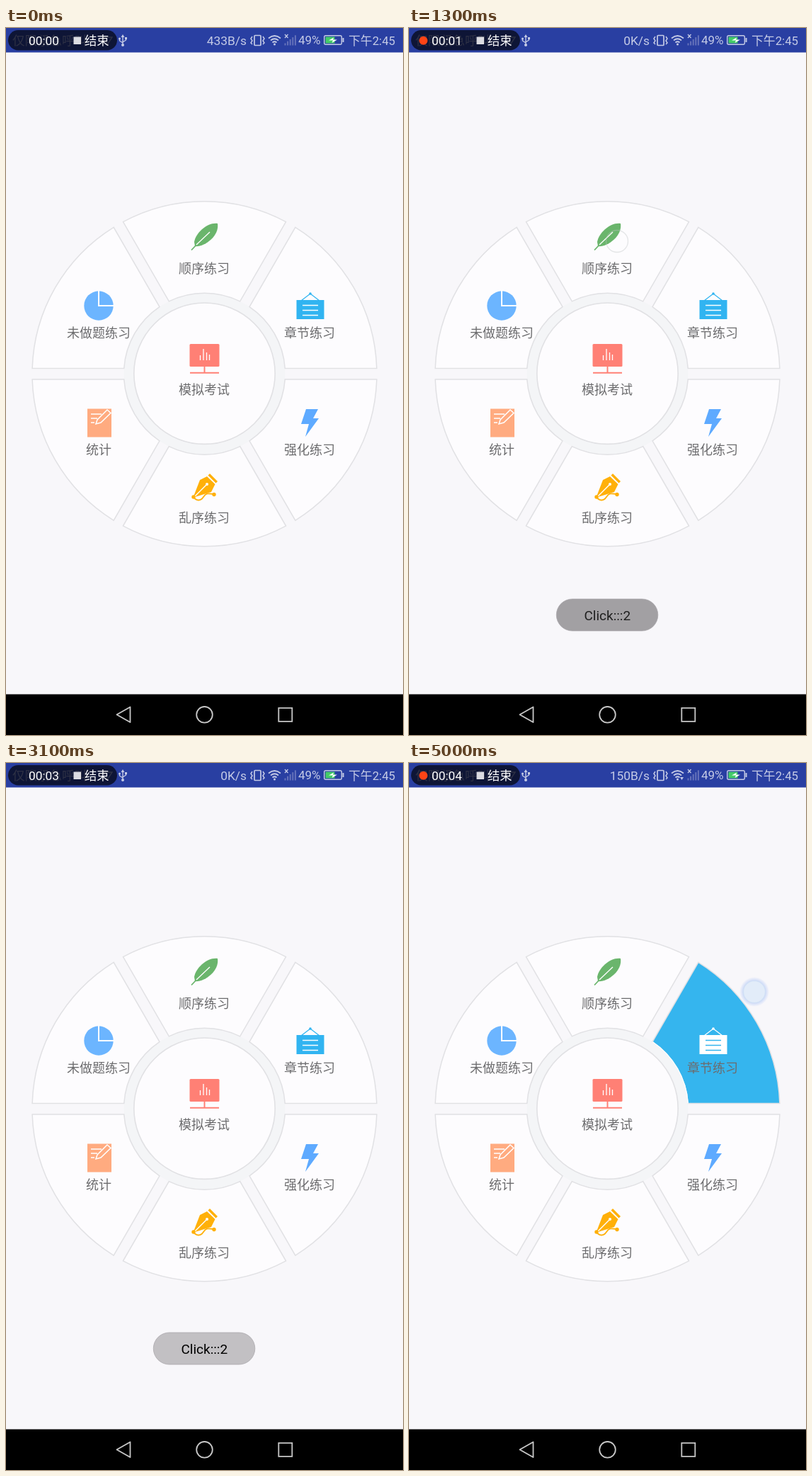
An HTML page with a canvas for the animation above (5100 ms loop, 561 by 998 pixels).

```html
<!DOCTYPE html>
<html lang="zh">
<head>
<meta charset="utf-8">
<title>Practice wheel</title>
<style>
html, body { margin: 0; width: 100%; height: 100%; overflow: hidden; background: #f8f7fa; }
canvas { display: block; width: 561px; height: 998px; }
</style>
</head>
<body>
<canvas id="stage" width="561" height="998"></canvas>
<script>
const ctx = document.getElementById('stage').getContext('2d');
const LOOP = 5100, STEP = 100;
const CX = 280.5, CY = 488.2, OUTER = 243.5, INNER = 114, GAP = 7.7;
const BLUE = '#35b5ee', PAPER = '#fdfcfe', EDGE = '#e1e1e4';
const FONT = 'Roboto, "Noto Sans CJK SC", "Noto Sans CJK", sans-serif';
const STATUS = '#c5cbe6';

const lerp = (a, b, p) => a + (b - a) * p;
const part = (t, a, b) => Math.min(1, Math.max(0, (t - a) / (b - a)));

function text(s, x, y, size, color, align = 'left') {
  ctx.font = `${size}px ${FONT}`;
  ctx.textAlign = align;
  ctx.fillStyle = color;
  ctx.fillText(s, x, y);
}

function rect(x, y, w, h, color, r = 0) {
  ctx.beginPath();
  ctx.roundRect(x, y, w, h, r);
  ctx.fillStyle = color;
  ctx.fill();
}

function disc(x, y, r, color) {
  ctx.beginPath();
  ctx.arc(x, y, r, 0, Math.PI * 2);
  ctx.fillStyle = color;
  ctx.fill();
}

function ring(x, y, r, color, width) {
  ctx.beginPath();
  ctx.arc(x, y, r, 0, Math.PI * 2);
  line(color, width);
}

function line(color, width) {
  ctx.strokeStyle = color;
  ctx.lineWidth = width;
  ctx.stroke();
}

function stroke(d, color, width = 1.5) {
  ctx.strokeStyle = color;
  ctx.lineWidth = width;
  ctx.stroke(new Path2D(d));
}

function fill(d, color) {
  ctx.fillStyle = color;
  ctx.fill(new Path2D(d));
}

// Each icon takes its body colour and the colour of its inner lines.
const icons = {
  feather(c, l) {
    fill('M299 276C285 274 268 289 266 302L267 308C279 310 302 294 299 276Z', c);
    stroke('M262 313.5L270 305', c, 1.8);
    stroke('M269 306L288 288', l, 1.3);
  },
  sign(c, l) {
    rect(410.5, 384, 39, 27, c);
    stroke('M417 385L430 375L443 385', c, 1.3);
    disc(430, 375, 1.8, c);
    stroke('M419 391.5H441M419 398.5H441M419 405.5H441', l, 1.4);
  },
  bolt(c) {
    fill('M424 538H441L434 551H442L423 577L428 559H417Z', c);
  },
  pen(c, l) {
    fill('M288 629L299 640L296.5 642.5L285.5 631.5Z', c);
    fill('M284 633L295.5 644L290 655L267 662L265.5 660L274 638Z', c);
    stroke('M267 661L283 645', l, 1.4);
    disc(284, 644, 2, l);
    stroke('M265 662C269 668 275 668 279 662S286 657 294 658', c, 1.8);
    disc(265, 662, 2.7, c);
    disc(294, 658.5, 2.7, c);
  },
  sheet(c, l) {
    rect(115, 537.5, 34, 40, c);
    stroke('M120 545H135M120 551H129M120 557H125', l, 1.6);
    stroke('M129 553L143 539L148 543.5L134 557L127 559Z', l, 1.5);
  },
  pie(c, l) {
    disc(131, 392, 20.7, c);
    stroke('M131 371V392H152', l, 2);
  },
  board(c, l) {
    rect(259.5, 446, 42, 32, c, 1.5);
    stroke('M274.5 462V469M279 453V469M283.5 458V469M287.5 461V469', l, 1.3);
    stroke('M280.5 478V486', c, 2);
    stroke('M260 486.7H301', c, 2);
  }
};

const slices = [
  ['feather', '#6ab56c', '顺序练习', 280, 340],
  ['sign', '#31b4f1', '章节练习', 429, 431],
  ['bolt', '#5eaaff', '强化练习', 429, 596],
  ['pen', '#ffb009', '乱序练习', 280, 692],
  ['sheet', '#ffab80', '统计', 131, 596],
  ['pie', '#6cb5ff', '未做题练习', 131, 431]
];

function label(s, x, y) {
  text(s, x, y + 6.4, 18, '#6c6c6e', 'center');
}

function slice(i, on) {
  const mid = (i * 60 - 90) * Math.PI / 180, half = Math.PI / 6;
  const o = half - Math.asin(GAP / OUTER), n = half - Math.asin(GAP / INNER);
  ctx.beginPath();
  ctx.arc(CX, CY, OUTER, mid - o, mid + o);
  ctx.arc(CX, CY, INNER, mid + n, mid - n, true);
  ctx.closePath();
  ctx.fillStyle = on ? BLUE : PAPER;
  ctx.fill();
  line(EDGE, 1.5);
  if (on) {
    ctx.beginPath();
    ctx.arc(CX, CY, INNER, mid - n, mid + n);
    line('#fff', 1.5);
  }
}

function wheel(active) {
  disc(CX, CY, INNER, '#f4f5f7');
  slices.forEach(([icon, color, name, x, y], i) => {
    const on = i === active;
    slice(i, on);
    icons[icon](on ? '#fff' : color, on ? BLUE : '#fff');
    label(name, x, y);
  });
  disc(CX, CY - 0.5, 99.7, PAPER);
  ring(CX, CY - 0.5, 99.7, EDGE, 1.6);
  icons.board('#ff8075', '#fff');
  label('模拟考试', 280, 511);
}

function statusBar(t) {
  rect(0, 0, 561, 34.5, '#293fa2');
  text('仅限紧急呼叫', 9, 24, 17.5, STATUS);
  stroke('M137 13H150L143.5 23Z', STATUS, 1.4);

  // USB
  stroke('M165 11V24M160.5 15V18L165 21M169.5 14V17L165 20', STATUS, 1.4);
  fill('M162.5 13L165 9L167.5 13Z', STATUS);
  disc(165, 24, 2, STATUS);
  disc(160.5, 15, 1.5, STATUS);
  rect(168, 13, 3, 3, STATUS);

  const speed = t < 1100 ? '433B/s' : t < 4100 ? '0K/s' : '150B/s';
  text(speed, 340, 24, 17.4, STATUS, 'right');

  // Vibration
  ctx.beginPath();
  ctx.roundRect(351, 10.5, 9, 14, 1);
  line(STATUS, 1.7);
  stroke('M348 12L346 15L348 18L346 21L348 23M363 12L365 15L363 18L365 21L363 23', STATUS, 1.5);

  // Wi-Fi
  stroke('M371 14.5Q379.5 7.5 388 14.5M374 17.5Q379.5 13 385 17.5M376.5 20.5Q379.5 18 382.5 20.5', STATUS, 1.7);
  disc(379.5, 23, 1.5, STATUS);
  if (t >= 4100) fill('M383 20H388L385.5 24Z', STATUS);

  // Signal
  stroke('M394 9L398.5 14M398.5 9L394 14', STATUS, 1.3);
  for (let i = 0; i < 5; i++) rect(393.5 + i * 3.6, 21.5 - i * 2.8, 2, 3 + i * 2.8, '#6673ba');

  text('49%', 413, 23.2, 17, STATUS);
  ctx.beginPath();
  ctx.roundRect(449.7, 10.7, 24.6, 12.6, 2);
  line(STATUS, 1.4);
  rect(475.5, 14, 2, 6, STATUS);
  rect(451.5, 12.5, 13, 9, '#43cc67');
  fill('M456 17.5L463 13.5L462 16.5H468L460.5 21L462 17.5Z', '#fff');
  text('下午2:45', 550, 24, 16.8, STATUS, 'right');
}

function recorder(t) {
  rect(3, 3, 154, 28.5, 'rgba(8,10,28,0.8)', 14.2);
  const dot = [[100, 600], [1100, 1600], [2100, 2700], [3200, 3600], [4100, LOOP]];
  if (dot.some(([a, b]) => t >= a && t < b)) disc(20.3, 17.8, 6, '#ff4416');
  const sec = [1000, 2000, 3000, 4100].filter(s => t >= s).length;
  text('00:0' + sec, 32, 24, 17.3, '#fff');
  rect(95.5, 12.5, 10.5, 10.5, '#dcdce2');
  text('结束', 111, 24, 17.3, '#fff');
}

function navBar() {
  rect(0, 940.5, 561, 57.5, '#000');
  ctx.lineJoin = 'round';
  stroke('M156.5 969.3L175.5 958.5V980Z', '#c8c8c8', 1.8);
  ctx.lineJoin = 'miter';
  ring(280.5, 969.3, 11.3, '#c8c8c8', 1.8);
  stroke('M385.3 959.8H404.3V978.8H385.3Z', '#c8c8c8', 1.8);
}

function toast(t) {
  if (t < 1200 || t >= 3600) return;
  const out = part(t, 3200, 3600);
  const y = 804 + 4 * (1 - part(t, 1200, 1400)) + 5 * out;
  const early = t < 1400;
  ctx.globalAlpha = t < 1300 ? 0.6 : 1 - out;
  rect(208.3, y, 143.5, 45, early ? '#a2a0a3' : '#c2c0c3', 22.5);
  line('#a5a3a6', 0.7);
  text('Click:::2', 280.3, y + 29.7, 19, early ? '#202020' : '#000', 'center');
  ctx.globalAlpha = 1;
}

function touch(x, y, alpha, veil = 0.65) {
  ctx.globalAlpha = alpha;
  const halo = ctx.createRadialGradient(x, y, 14, x, y, 21);
  halo.addColorStop(0, 'rgba(150,180,245,0.55)');
  halo.addColorStop(1, 'rgba(150,180,245,0)');
  disc(x, y, 21, halo);
  disc(x, y, 15.5, `rgba(240,246,250,${veil})`);
  ring(x, y, 15.5, 'rgba(205,222,245,0.7)', 1.5);
  ctx.globalAlpha = 1;
}

function finger(t) {
  if (t >= 1000 && t < 1300) touch(294, 301, 1, 0.48);
  else if (t >= 1300 && t < 1500) {
    ring(294, 301, 15.5, `rgba(190,196,196,${t < 1400 ? 0.4 : 0.15})`, 1.3);
  } else if (t >= 2000 && t < 3100) {
    const p = part(t, 2600, 2900);
    touch(lerp(304, 318, p), lerp(337, 222, p), t < 3000 ? 1 : 0.3, 0.7);
  } else if (t >= 3600) {
    const p = part(t, 4300, 4600), q = part(t, 4600, 5000);
    touch(lerp(465, 488, q), lerp(lerp(442, 395, p), 323, q), 1, 0.7);
  }
}

function draw(t) {
  const active = (t >= 1000 && t < 1200) || (t >= 2000 && t < 3000) ? 0 : t >= 3600 ? 1 : -1;
  rect(0, 0, 561, 998, '#f8f7fa');
  wheel(active);
  statusBar(t);
  recorder(t);
  navBar();
  toast(t);
  finger(t);
}

const start = performance.now();
function tick() {
  const t = (performance.now() - start) % LOOP;
  draw(Math.floor(t / STEP) * STEP);
  requestAnimationFrame(tick);
}
tick();
</script>
</body>
</html>
```
